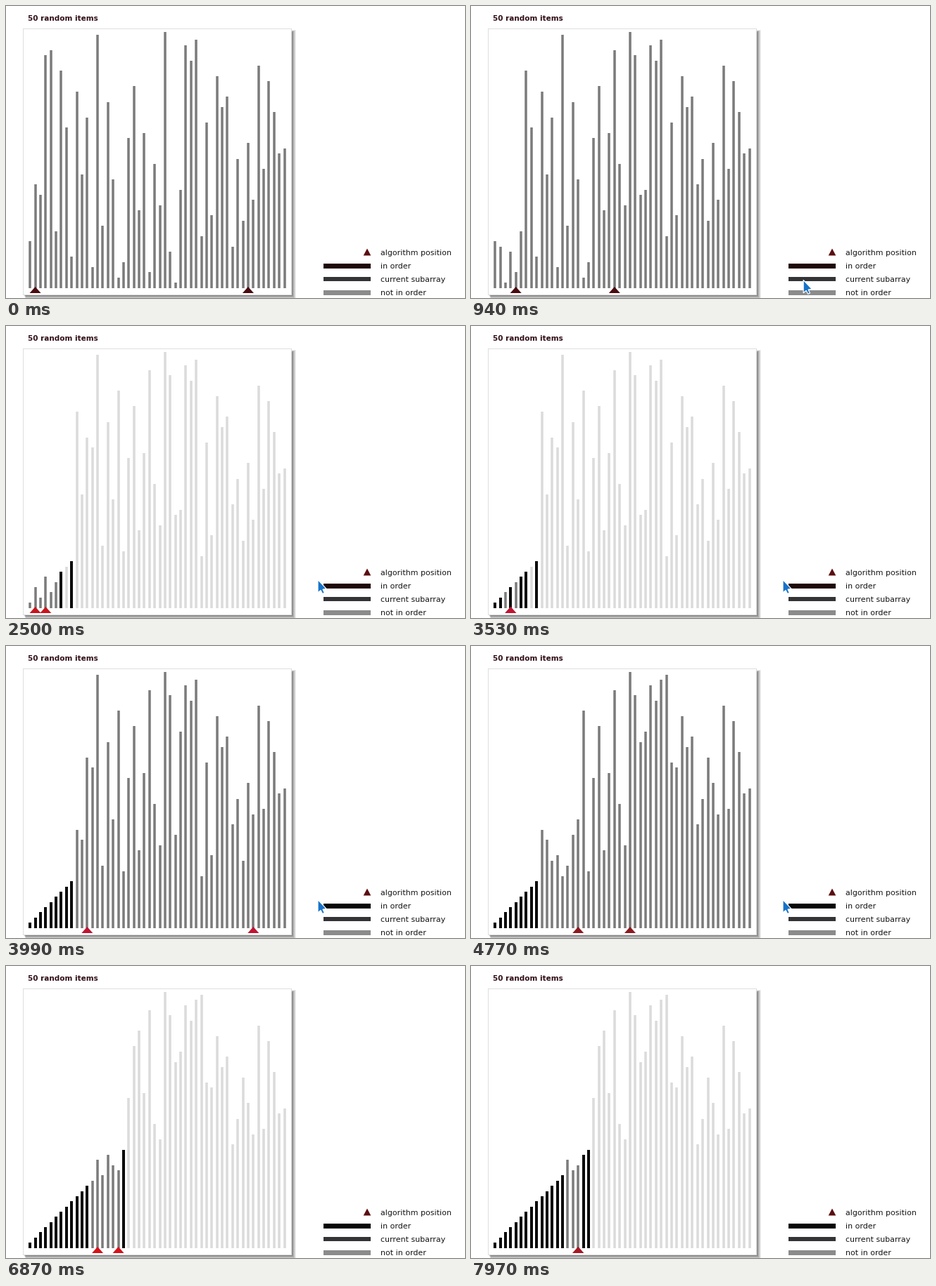
Write a matplotlib script that moves like this. It is 652 by 416 pixels and loops after 8 s.

```python
import matplotlib.pyplot as plt
import numpy as np
from matplotlib.animation import FuncAnimation
from matplotlib.collections import LineCollection
from matplotlib.patches import Polygon, Rectangle

W, H, DPI = 652, 416, 100
PX = 72 / DPI
LOOP, TICK, STEP = 8000, 20, 78.1

START = [24, 20, 18, 45, 46, 11, 42, 31, 6, 38, 22, 33, 4, 49, 12, 36, 21,
         2, 5, 29, 39, 15, 30, 3, 9, 16, 50, 7, 1, 19, 47, 44, 48, 10, 32,
         14, 41, 35, 37, 8, 25, 13, 28, 17, 43, 23, 40, 34, 26, 27]

BLACK, GRAY, LIGHT = "#080808", "#7b7b7b", "#dbdbdb"
X0, DX, BASE, UNIT, TOP = 34.2, 7.375, 401.5, 7.36, 37


def quicksort(items):
    """Record every move of a quicksort whose pivot is the middle item."""
    a, done, log = list(items), set(), []

    def snap(lo, hi, i, j):
        log.append((tuple(a), frozenset(done), (lo, hi, i, j)))

    def swap(p, q):
        a[p], a[q] = a[q], a[p]

    def sort(lo, hi):
        if hi < lo:
            return
        if hi == lo:
            done.add(lo)
            snap(lo, hi, lo, lo)
            return
        swap(lo, (lo + hi) // 2)
        snap(lo, hi, lo, hi)
        snap(lo, hi, lo, hi)
        pivot, i, j = a[lo], lo, hi + 1
        while True:
            while i < hi:
                i += 1
                snap(lo, hi, i, min(j, hi))
                if a[i] >= pivot:
                    break
            while True:
                j -= 1
                snap(lo, hi, i, j)
                if a[j] <= pivot:
                    break
            if i >= j:
                break
            swap(i, j)
            snap(lo, hi, i, j)
        swap(lo, j)
        done.add(j)
        snap(lo, hi, j, j)
        snap(lo, hi, j, j)
        sort(lo, j - 1)
        sort(j + 1, hi)

    sort(0, len(a) - 1)
    return log


LOG = quicksort(START)

# Pacing: (tick, (lo, hi, i, j) reached at that tick, marker colour)
PACE = [(0, (0, 49, 1, 42), "#4a0a10"),
        (23, (0, 49, 8, 8), "#c8141c"),
        (45, (2, 4, 3, 3), "#c01432"),
        (61, (9, 49, 16, 26), "#8c1a20"),
        (69, (9, 17, 10, 17), "#8c1a20"),
        (88, (12, 17, 13, 17), "#d81018"),
        (102, (14, 16, 16, 16), "#a81824")]
KEYS = [p[0] for p in PACE]
STATES = [s[2] for s in LOG]
MOVES = [STATES.index(p[1]) for p in PACE]

fig = plt.figure(figsize=(W / DPI, H / DPI), dpi=DPI, facecolor="white")
ax = fig.add_axes([0, 0, 1, 1])
ax.set_xlim(0, W)
ax.set_ylim(H, 0)
ax.axis("off")


def box(x0, y0, x1, y1, color, z=1, alpha=1):
    patch = Rectangle((x0, y0), x1 - x0, y1 - y0, fc=color, ec="none",
                      alpha=alpha, zorder=z)
    ax.add_patch(patch)
    return patch


def label(x, y, text, px, color, weight="normal"):
    ax.text(x, y, text, fontsize=px * PX, color=color, weight=weight,
            family="DejaVu Sans", va="baseline", ha="left")


def triangle(x, y, half, height):
    return [(x, y), (x + half, y + height), (x - half, y + height)]


# Panel with a soft shadow to the lower right
for n in range(7):
    box(25 + n / 2, 37 - n / 2, 406 + n, 412 + n, "black", 0, 0.14 - 0.012 * n)
box(23.5, 31.5, 406, 411.5, "#dedede")
box(25, 33, 405, 411, "white")

label(31, 21, "50 random items", 10.4, "#321018", "bold")

ax.add_patch(Polygon(triangle(513, 345.5, 5.3, 10), fc="#5a0f12", ec="none"))
order_key = box(450.5, 367, 518, 373.5, BLACK)
box(450.5, 385.5, 518, 392, "#343437")
box(450.5, 405, 518, 411.5, "#8b8b8b")
for n, text in enumerate(["algorithm position", "in order",
                          "current subarray", "not in order"]):
    label(532.5, 355 + 19 * n, text, 10.95, "#161616")

bars = LineCollection([], capstyle="butt", zorder=3)
ax.add_collection(bars)
markers = [Polygon(triangle(0, 0, 1, 1), ec="none", zorder=4)
           for _ in range(2)]
for m in markers:
    ax.add_patch(m)

ARROW = np.array([(0, 0), (0, 18.5), (4, 15), (6.6, 20), (9.4, 18.7),
                  (7, 13.7), (12.2, 13)])
cursor = Polygon(ARROW, fc="#1673c8", ec="white", lw=1.2 * PX, zorder=6)
ax.add_patch(cursor)
CURSOR_T = [500, 1400, 6300, 6800]
CURSOR_X = [500, 443, 443, 656]
CURSOR_Y = [418, 361.5, 361.5, 400]


def draw(frame):
    t = frame * TICK
    k = int((t - 56) // STEP) + 1
    items, done, (lo, hi, i, j) = LOG[round(np.interp(k, KEYS, MOVES))]

    lines, colors, widths = [], [], []
    for n, v in enumerate(items):
        x = X0 + DX * n
        lines.append([(x, BASE), (x, max(TOP, BASE - UNIT * v))])
        ready = n in done
        colors.append(BLACK if ready else GRAY if lo <= n <= hi else LIGHT)
        widths.append((4.0 if ready else 3.5) * PX)
    bars.set_segments(lines)
    bars.set_color(colors)
    bars.set_linewidth(widths)

    tone = PACE[np.searchsorted(KEYS, k, "right") - 1][2]
    for m, n in zip(markers, (i, j)):
        m.set_xy(triangle(X0 + DX * n, 400, 8, 9))
        m.set_facecolor(tone)

    order_key.set_facecolor("#200707" if k <= 45 else "#060606")
    cursor.set_xy(ARROW + (np.interp(t, CURSOR_T, CURSOR_X),
                           np.interp(t, CURSOR_T, CURSOR_Y)))
    cursor.set_visible(CURSOR_T[0] <= t <= CURSOR_T[-1])
    return [bars, *markers, order_key, cursor]


anim = FuncAnimation(fig, draw, frames=LOOP // TICK, interval=TICK,
                     init_func=lambda: draw(0), repeat=True, repeat_delay=0)
plt.show()
```
